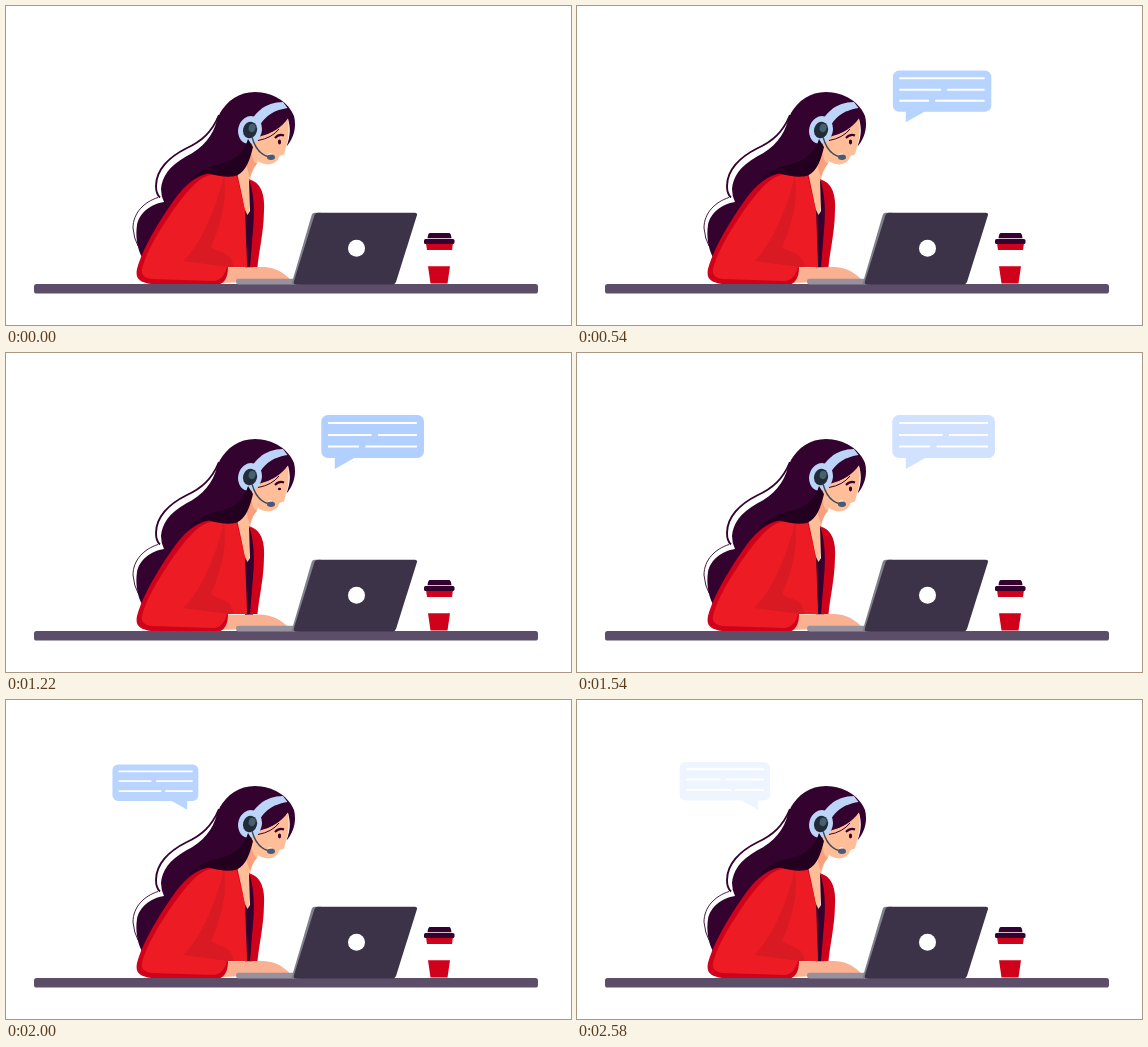
Animation of 565x319 px, one loop 2780 ms. Source, as an HTML page:

```html
<!DOCTYPE html>
<html lang="en">
<head>
<meta charset="utf-8">
<title>Support desk</title>
<style>
html, body { margin: 0; width: 100%; height: 100%; overflow: hidden; background: #fff; }
svg { display: block; width: 100%; height: 100%; }
</style>
</head>
<body>
<svg viewBox="0 0 565 319" xmlns="http://www.w3.org/2000/svg">
  <rect width="565" height="319" fill="#fff"/>

  <g id="hair" fill="#34022f">
    <path d="M249 86C233 86 221 95 214 107L211 114C207 130 197 142 180 150.500C163 160 156 171 155 183Q155 190 158 196C145 198 133 207 131 219C129 232 132 245 137 253L190 215L231 170C240 165 246 156 249 148L270 122L282 113C285 123 284 131 280.500 140.500C287 133 291 122 288 110C282 95 266 86 249 86Z"/>
    <path d="M213 109C206 126 196 135 180 142.500C163 151 150 164 150 180Q150 188 154 191.500" fill="none" stroke="#34022f" stroke-width="1.9"/>
    <path d="M152 191.500C138 196 127 207 127 222Q128 233 132 240" fill="none" stroke="#34022f" stroke-width=".9"/>
  </g>

  <g id="neck">
    <path d="M246 136C245 149 239 160 231 167L237 200Q239 209 241.500 209Q244 208 244 190L244 174Q246 163 252 156Z" fill="#ffbd98"/>
    <path d="M246 147Q246 155 251 158Q246 163 244 171Q240 161 241 157Z" fill="#fa9f7b"/>
    <path d="M243 174L250 182L248 230L247 262H239V204L241.500 209L244 205Z" fill="#34022f"/>
  </g>

  <g id="face">
    <path d="M282 112C283 121 283 130 281 137L278 148.500L273.500 150Q271 158 262 158.500Q252 158 247 149L245 132Q268 130 282 112Z" fill="#ffbd98"/>
    <path d="M248 130C262 130 275 123 282 112L270 98L248 112Z" fill="#34022f"/>
    <path d="M252 134.500Q266 132 273 123" fill="none" stroke="#34022f" stroke-width="1"/>
    <path d="M269 132Q273 127.500 278 129.500" fill="none" stroke="#34022f" stroke-width="2.1"/>
    <ellipse id="eye" cx="273.5" cy="136" rx="1.6" ry="2.4" fill="#34022f"/>
    <path d="M262.500 148.300H266" stroke="#fff" stroke-width="1.6"/>
  </g>

  <g id="headset">
    <path d="M246 113C253 102 264 96 277 96L281.500 102C269 104 260 109 254 119Z" fill="#bcd4f8"/>
    <g transform="rotate(15 244 124)">
      <ellipse cx="244" cy="124" rx="11.8" ry="14" fill="#bcd4f8"/>
      <ellipse cx="244" cy="124" rx="7" ry="8.4" fill="#222c38"/>
      <ellipse cx="245.500" cy="121.500" rx="3.4" ry="4.2" fill="#466070"/>
    </g>
    <path d="M246 131C249 142 255 150 265 151" fill="none" stroke="#3c4b5a" stroke-width="1.4"/>
    <ellipse cx="265" cy="151.3" rx="4" ry="2.7" fill="#485a78"/>
  </g>

  <path id="hand" d="M216 261C235 262 246 261 258 261C270 261.500 278 267 285 274L216 277Z" fill="#f9b192"/>

  <g id="jacket">
    <path d="M245 174C254 177 259 187 258 204C258 225 253 244 251.500 261H244L247 224Q250 193 243 173Z" fill="#d0021b"/>
    <path d="M231 167C222 169 210 165 200 168C187 172 177 181 166 197C150 220 136 244 131 263C129 273 134 276 145 278L212 279C219 277 222 271 222 261L241 261L239 204C236 190 234 179 231 167Z" fill="#d0021b"/>
    <path d="M230 168C222 170 210 166 201 170C190 174 179 188 168 203C153 225 140 246 136 263C135 269 138 272 146 273L209 275Q218 273 221 261L241 261L239 206C236 190 233 179 230 168Z" fill="#ed1c24"/>
    <path d="M218 170C221 190 217 214 205 241C211 246 222 246 225 253L228 261H222L177 255C194 240 209 205 218 170Z" fill="#d91a22"/>
    <path d="M242 133C238 148 226 156 210 159C196 163 188 168 182 176Q191 168 203 167.500C212 170 223 172 231 169.500C240 165 244 154 247 141Z" fill="#23001f"/>
  </g>

  <rect x="28" y="278" width="504" height="9.6" rx="2.6" fill="#5c4e68"/>

  <g id="laptop">
    <rect x="230" y="272.8" width="62" height="5.6" rx="2.4" fill="#96919d"/>
    <path d="M285.500 278L305.700 209Q306.500 206.700 308.500 206.700H315L293 278.4Z" fill="#7f8089"/>
    <path d="M312 206.700H409Q411.500 206.700 411 209L390 276Q389 278.400 387 278.400H289.500Q287 278.400 288 275L308.500 209Q309.500 206.700 312 206.700Z" fill="#3d3348"/>
    <circle cx="350.5" cy="242.3" r="8.5" fill="#fff"/>
  </g>

  <g id="cup">
    <path d="M420 237H447L446 244H421ZM422 260.300H444L441.500 277.600H424.500Z" fill="#d0021b"/>
    <path d="M424 227H443Q445 227 445.500 232.300H421.500Q422 227 424 227Z" fill="#34022f"/>
    <rect x="418" y="233" width="30.5" height="5" rx="1.6" fill="#34022f"/>
  </g>

  <g id="right" fill="#b1d0ff">
    <path d="M328.800 103V116L350 104Z"/>
    <rect x="315.3" y="62" width="102.7" height="43" rx="6.5"/>
    <path d="M322 70H411M322 82H365.500M372 82H411M322 93.500H353M359.500 93.500H411" stroke="#fff" stroke-width="2"/>
  </g>
  <g id="left" fill="#b1d0ff">
    <path d="M162 99L181.200 109.700V98Z"/>
    <rect x="102.5" y="62" width="90.5" height="38.5" rx="6"/>
    <path d="M109 69.200H187M109 79.500H143.500M148.500 79.500H187M109 90H154M158 90H187" stroke="#fff" stroke-width="1.9"/>
  </g>
</svg>
<script>
const LOOP = 2780, REST = 2580;
const GROW = 854, FADE = 520, TYPING = 516;
const bubbles = [
  { id: 'right', x: 329, y: 125, start: 145, end: 1332 },
  { id: 'left', x: 181, y: 111, start: 1628, end: 2164 }
];
const el = id => document.getElementById(id);
const unit = v => Math.min(1, Math.max(0, v));
const easeOut = u => 1 - (1 - u) ** 4;

function drawBubble(b, t) {
  const grown = easeOut(unit((t - b.start) / GROW));
  const scale = 0.5 + 0.5 * grown;
  const node = el(b.id);
  node.setAttribute('opacity', grown * (1 - unit((t - b.end) / FADE)));
  node.setAttribute('transform',
    `translate(${b.x} ${b.y}) scale(${scale}) translate(${-b.x} ${-b.y})`);
}

function render(time) {
  const t = Math.min(time % LOOP, REST);
  bubbles.forEach(b => drawBubble(b, t));

  const swing = Math.cos(t / TYPING * 2 * Math.PI);
  el('hand').setAttribute('transform',
    `translate(${swing - 1} 0) rotate(${0.6 - 0.6 * swing} 221 268)`);

  const lid = 1 - 0.85 * unit(1 - Math.abs(t - 1260) / 90);
  el('eye').setAttribute('ry', 2.4 * lid);
}

const began = performance.now();
function tick() {
  render(performance.now() - began);
  requestAnimationFrame(tick);
}
tick();
</script>
</body>
</html>
```
